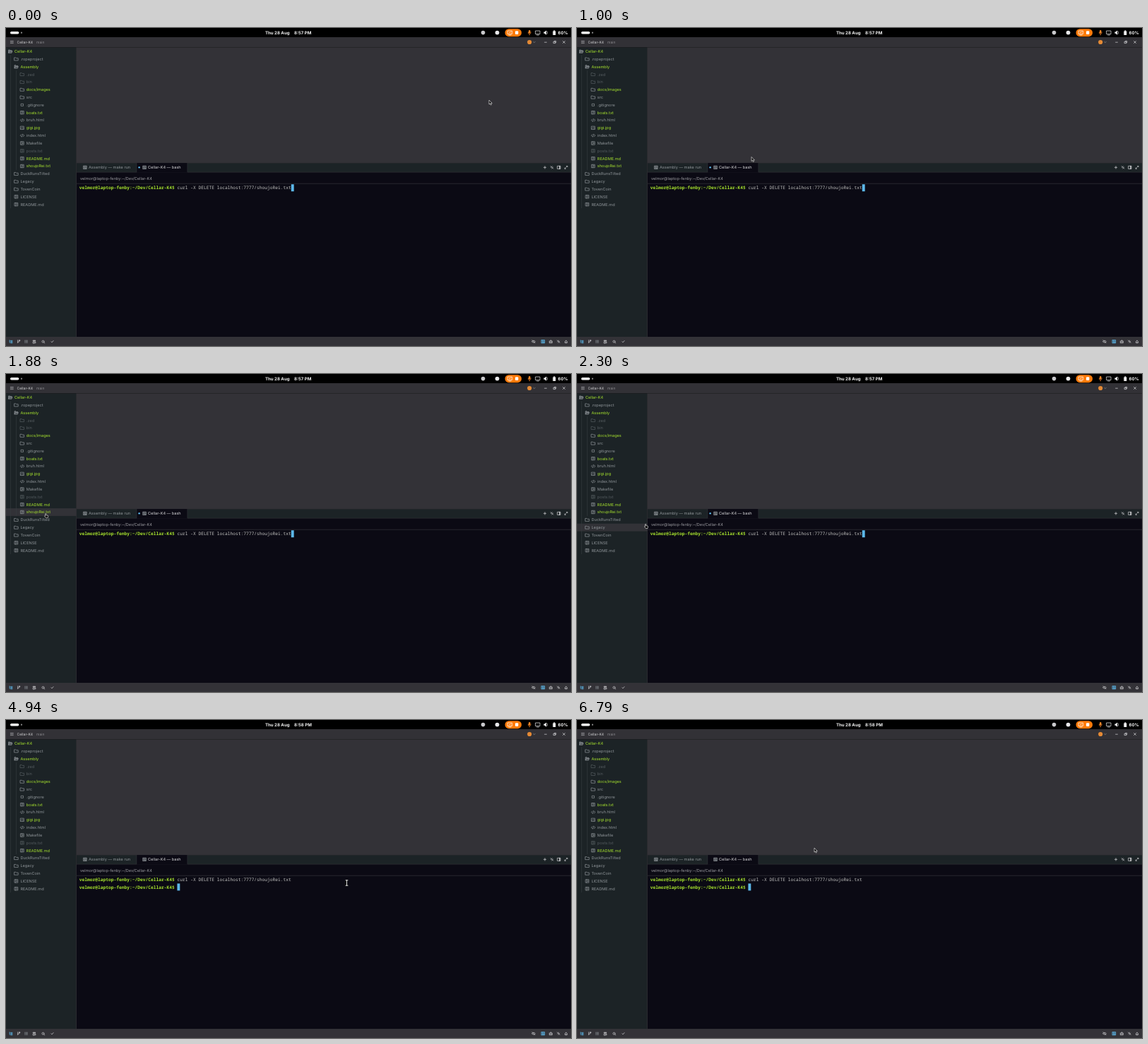
An HTML page for the animation above (7.58 s loop, 800 by 450 pixels).

```html
<!DOCTYPE html>
<html lang="en">
<head>
<meta charset="utf-8">
<title>Deleting a file with curl</title>
<style>
  html, body { margin: 0; width: 100%; height: 100%; overflow: hidden; background: #000; }
  svg { display: block; width: 100vw; height: 100vh; }
  text { font: 5.6px Inter, sans-serif; text-rendering: geometricPrecision; white-space: pre; }
  .bold { font-weight: 700; font-size: 6.1px; }
  .small { font-size: 5px; }
  .term { font: 6.25px "Noto Sans Mono", "DejaVu Sans Mono", monospace; }
  .prompt { font-weight: 700; fill: #a6e22e; }
  .icon { fill: none; fill-opacity: .5; stroke-width: .7; stroke-linejoin: round; stroke-linecap: round; }
  .pointer { fill: #0a0a0a; stroke: #e8e8e8; stroke-width: .65; stroke-linejoin: round; }
</style>
</head>
<body>
<svg id="stage" viewBox="0 0 800 450"></svg>
<script>
const LOOP = 7580;
const ROW = 10.83, TREE_TOP = 27.6, TREE_RIGHT = 99;
const GREEN = '#a6e22e', GREY = '#8e9498', DIM = '#555c60', LIGHT = '#d6d6d8', BLUE = '#5cb8ea';
const HOVER_LAG = 60;
const ENTER = 3790, FILE_GONE = 3920, CLOCK_TICK = 4080;

const USER = 'velmor@laptop-fenby', FOLDER = 'Cellar-K4';
const PROMPT = `${USER}:~/Dev/${FOLDER}$`;
const COMMAND = 'curl -X DELETE localhost:7777/shoujoRei.txt';

// Icons are drawn around their own centre.
const ICONS = {
  folder: 'M-2.6-1.9H-.7L0-1.1H2.6V2.1H-2.6Z',
  open: 'M-2.6 2V-2H-.7L0-1.2H2V-.3M-2.6 2L-1.6-.3H2.8L1.9 2Z',
  file: 'M-2.2-2.2H2.2V2.2H-2.2ZM-.8-2.2V2.2M.4-.8H1.2M.4.5H1.2',
  code: 'M-1.3-1.5L-2.8 0L-1.3 1.5M1.3-1.5L2.8 0L1.3 1.5M.5-1.9L-.5 1.9',
  image: 'M-2.3-2.2H2.3V2.2H-2.3ZM-2.3 1.2L-.7-.3L.6.9L1.3.3L2.3 1.2M.8-1H1',
  square: 'M-1.5-1.5H1.5V1.5H-1.5Z',
  terminal: 'M-2.2-2.2H2.2V2.2H-2.2ZM-1.1-.9L-.1 0L-1.1.9M.2 1H1.2',
  menu: 'M-2-1.6H2M-2 0H2M-2 1.6H2',
  down: 'M-1.2-.5L0 .7L1.2-.5',
  minus: 'M-1.4.2H1.4',
  restore: 'M-1.6-.7H.8V1.6H-1.6ZM-.6-.7V-1.6H1.7V.7H.8',
  close: 'M-1.5-1.5L1.5 1.5M1.5-1.5L-1.5 1.5',
  plus: 'M-1.7 0H1.7M0-1.7V1.7',
  split: 'M-2-2H2V2H-2ZM.5-2V2M1.2-2V2',
  expand: 'M.4-.4L1.9-1.9M.6-1.9H1.9V-.6M-.4.4L-1.9 1.9M-.6 1.9H-1.9V.6',
  pen: 'M-1.8-1.8L1.7 1.7M-1.5.1L.2-1.5M-.3 1.5L1.6-.3',
  tree: 'M-1.8-2V1.6H.4M-1.8-.7H.4M.7-1.4H2V-.2H.7ZM.7 1H2V2.1H.7Z',
  branch: 'M-1.3-2V2M-1.3.6C0 .6 1.3.3 1.3-1M.8-2H1.8V-1H.8Z',
  list: 'M-2-1.5H-1.5M-.5-1.5H2M-2 0H-1.5M-.5 0H2M-2 1.5H-1.5M-.5 1.5H2',
  people: 'M-1.9 2V.7L-.8 0L.2.7V2ZM.7 2H2V.7L1 0M-1.4-1.7H-.3V-.6H-1.4ZM.6-1.7H1.6V-.6H.6Z',
  search: 'M1 0A1.5 1.5 0 1 1-2 0A1.5 1.5 0 1 1 1 0M.6 1.1L1.8 2.2',
  check: 'M-1.5.1L-.5 1.2L1.6-1.2',
  hidden: 'M-2.4 0Q0-3 2.4 0Q0 3-2.4 0M-2-2L2 2',
  robot: 'M-1.8-.8H1.8V2H-1.8ZM0-2V-.8M-.8.4V.8M.8.4V.8',
  bell: 'M-1.7 1.2L-1.2.4V-.7Q0-2.8 1.2-.7V.4L1.7 1.2ZM-.4 2H.4'
};
const SOLID = ['open', 'terminal'];

// depth, icon, label, colour
const FILES = [
  [0, 'open', FOLDER, GREEN], [1, 'folder', '.ropeproject', GREY], [1, 'open', 'Assembly', GREEN],
  [2, 'folder', '.zed', DIM], [2, 'folder', 'bin', DIM], [2, 'folder', 'docs/images', GREEN],
  [2, 'folder', 'src', GREY], [2, 'square', '.gitignore', GREY], [2, 'file', 'boats.txt', GREEN],
  [2, 'code', 'bruh.html', GREY], [2, 'image', 'gigi.jpg', GREEN], [2, 'code', 'index.html', GREY],
  [2, 'file', 'Makefile', GREY], [2, 'file', 'posts.txt', DIM], [2, 'file', 'README.md', GREEN],
  [2, 'file', 'shoujoRei.txt', GREEN], [1, 'folder', 'DuckRunsTilted', GREY],
  [1, 'folder', 'Legacy', GREY], [1, 'folder', 'TovenCoin', GREY],
  [1, 'file', 'LICENSE', GREY], [1, 'file', 'README.md', GREY]
];
const DELETED = 15;

const rect = (x, y, w, h, fill, extra = '') =>
  `<rect x="${x}" y="${y}" width="${w}" height="${h}" fill="${fill}" ${extra}/>`;
const dot = (x, y, r, fill, extra = '') => `<circle cx="${x}" cy="${y}" r="${r}" fill="${fill}" ${extra}/>`;
const text = (x, y, str, fill, cls = '', extra = '') =>
  `<text x="${x}" y="${y}" fill="${fill}" class="${cls}" ${extra}>${str}</text>`;
const icon = (name, x, y, color = GREY) =>
  `<path class="icon" stroke="${color}" style="fill:${SOLID.includes(name) ? color : 'none'}"
    transform="translate(${x} ${y})" d="${ICONS[name]}"/>`;
const iconRow = (y, items) => items.map(([name, x, color]) => icon(name, x, y, color)).join('');

function topBar() {
  return rect(0, 0, 800, 13, '#000') + rect(6, 5, 12.3, 3.4, '#fff', 'rx="1.7"') + dot(22, 6.7, 1.1, '#8a8a8a') +
    text(367, 8.8, 'Thu 28 Aug', '#f4f4f4', 'bold') + text(408, 8.8, '8:57 PM', '#f4f4f4', 'bold', 'id="clock"') +
    dot(675.5, 6.6, 2.8, '#c9c9cc') + dot(695.5, 6.6, 2.9, '#e8e8ea') +
    rect(706.5, 1.2, 23.5, 11, '#ff7b0a', 'rx="5.5"') +
    '<path class="icon" stroke="#fff" d="M710.5 4H716.5V8.5H710.5ZM712 10H715M712.3 6.5L714.8 5.8"/>' +
    rect(721, 4.3, 4.3, 4.6, '#fff', 'rx="1"') +
    '<path class="icon" stroke="#ff8a2a" d="M739.2 6A2 2.5 0 0 0 743.2 6M741.2 8.6V10"/>' +
    rect(740, 3, 2.4, 4.4, '#ff8a2a', 'rx="1.2"') +
    '<path class="icon" stroke="#eee" d="M750 4H756V8.6H750ZM751.5 10H754.5M766 4.6Q767.4 6.6 766 8.6"/>' +
    '<path fill="#eee" d="M761.4 5.4H762.7L765 3.4V9.8L762.7 7.8H761.4Z"/>' +
    rect(774.3, 4.3, 4, 5.8, '#eee', 'rx=".7"') + rect(775.4, 3.3, 1.8, 1.2, '#eee') +
    text(781.5, 8.8, '60%', '#f4f4f4', 'bold');
}

function titleBar() {
  return rect(0, 13, 800, 14.5, '#323136') + icon('menu', 8.3, 20, '#a8a8ac') +
    text(15.6, 21.8, FOLDER, LIGHT, 'small') + text(43, 21.8, 'main', '#8c8c90', 'small') +
    dot(741.2, 20, 3.1, '#e58a35') +
    iconRow(20, [['down', 748], ['minus', 764, LIGHT], ['restore', 777, LIGHT], ['close', 790, LIGHT]]);
}

function fileRow([depth, name, label, color], i) {
  const x = 6 + depth * 8.4, y = TREE_TOP + ROW * (i + .5);
  return `<g id="row${i}">${icon(name, x + .2, y, color === DIM ? DIM : GREY)}${text(x + 6, y + 2, label, color)}</g>`;
}

function sidebar() {
  return rect(0, 27.5, 99.5, 409.5, '#1c2326') + rect(0, 0, 99.5, ROW, '#323237', 'id="hover"') +
    rect(6, TREE_TOP + ROW, .6, ROW * 20, '#353c40', 'id="guide1"') +
    rect(14.2, TREE_TOP + ROW * 3, .6, ROW * 13, '#353c40', 'id="guide2"') +
    FILES.map(fileRow).join('') + rect(99.3, 27.5, .8, 409.5, '#35363b');
}

function panel() {
  return rect(100, 27.5, 700, 163.5, '#333237') +
    rect(100, 191, 700, 13.3, '#1c2326') + rect(100, 204, 700, 233, '#0b0a14') +
    rect(100, 190.8, 700, .6, '#29292f') + rect(100, 203.8, 700, .6, '#34343a') +
    rect(185, 191, 72, 13.6, '#0b0a14') + rect(184.6, 191, .6, 13, '#34343a') + rect(256.6, 191, .6, 13, '#34343a') +
    icon('terminal', 112, 197.3) + text(117, 199.3, 'Assembly — make run', GREY) +
    dot(188.6, 197.3, 1.2, BLUE, 'id="bell"') +
    icon('terminal', 196.2, 197.3) + text(201, 199.3, `${FOLDER} — bash`, LIGHT) +
    iconRow(197.3, [['plus', 763, LIGHT], ['pen', 773, LIGHT], ['split', 783, LIGHT], ['expand', 793, LIGHT]]) +
    text(105, 214.6, `${USER}:~/Dev/${FOLDER}`, '#9a9a9f') + rect(100, 219.8, 700, .7, '#34343a') +
    text(103.8, 228.3, PROMPT, GREEN, 'term prompt') + text(242.5, 228.3, COMMAND, '#c4c4c2', 'term') +
    text(103.8, 238.7, PROMPT, GREEN, 'term prompt', 'id="prompt2"') +
    rect(0, 0, 3.9, 10, BLUE, 'id="caret"');
}

function statusBar() {
  return rect(0, 437, 800, 13, '#333237') + iconRow(443.7, [
    ['tree', 7, BLUE], ['branch', 18, LIGHT], ['list', 28.5], ['people', 40, LIGHT], ['search', 53, LIGHT],
    ['check', 65.5, LIGHT], ['hidden', 747, LIGHT], ['terminal', 760.5, BLUE], ['robot', 771.5, LIGHT],
    ['pen', 782.3, LIGHT], ['bell', 793, LIGHT]]);
}

const POINTERS = `
  <path id="arrow" class="pointer" d="M0 0V6L1.4 4.8L2.4 7L3.4 6.5L2.5 4.4H4.3Z"/>
  <path id="hand" class="pointer" d="M0 .6Q.6-.3 1.2.6V2.6L3.4 3Q4.2 3.2 4 4.1L3.5 6.5H.9L-1.1 4Q-.9 3.1 0 3.8Z"/>
  <g id="beam" fill="none" stroke-linecap="round">
    <path stroke="#0a0a0a" stroke-width="1.8" d="M-1.5-3.7H1.5M0-3.7V3.7M-1.5 3.7H1.5"/>
    <path stroke="#f2f2f2" stroke-width=".9" d="M-1.5-3.7H1.5M0-3.7V3.7M-1.5 3.7H1.5"/>
  </g>`;

document.getElementById('stage').innerHTML =
  topBar() + titleBar() + sidebar() + panel() + statusBar() + `<g id="mouse">${POINTERS}</g>`;

const $ = id => document.getElementById(id);
const show = (id, on) => $(id).setAttribute('visibility', on ? 'visible' : 'hidden');
const moveTo = (id, x, y) => $(id).setAttribute('transform', `translate(${x} ${y})`);

// Mouse strokes as [time, x, y]; the mouse rests between them.
const STROKES = [
  [[0, 684, 102], [480, 595, 107], [780, 420, 142], [1080, 190, 196], [1280, 94, 219], [1410, 82, 216],
   [1480, 78, 207], [1780, 54, 199], [2030, 66, 198], [2200, 86, 214], [2300, 96, 212],
   [2600, 300, 225], [2970, 506, 229]],
  [[4940, 482.5, 230.5], [5200, 300, 226], [5450, 130, 208], [5650, 70, 197], [5900, 56, 195],
   [6150, 90, 194], [6450, 216, 194], [6790, 336, 181]]
];

function slope(pts, i, axis) {
  const a = pts[i - 1], b = pts[i + 1];
  return a && b ? (b[axis] - a[axis]) / (b[0] - a[0]) : 0;
}

function mouseAt(t) {
  const pts = t < STROKES[1][0][0] ? STROKES[0] : STROKES[1];
  const next = pts.findIndex(p => p[0] > t);
  if (next < 0) return pts[pts.length - 1].slice(1);
  if (next === 0) return pts[0].slice(1);
  const a = pts[next - 1], b = pts[next], span = b[0] - a[0], u = (t - a[0]) / span;
  const v = 1 - u;
  return [1, 2].map(k =>
    v * v * (1 + 2 * u) * a[k] + u * u * (3 - 2 * u) * b[k] +
    span * u * v * (v * slope(pts, next - 1, k) - u * slope(pts, next, k)));
}

function pointerFor(x, y) {
  if (x < TREE_RIGHT) return y > TREE_TOP ? 'hand' : 'arrow';
  return y > 220.5 && y < 437 ? 'beam' : 'arrow';
}

function drawTree(t) {
  const gone = t >= FILE_GONE, shift = gone ? ROW : 0;
  show('row' + DELETED, !gone);
  for (let i = DELETED + 1; i < FILES.length; i++) moveTo('row' + i, 0, -shift);
  $('guide1').setAttribute('height', ROW * 20 - shift);
  $('guide2').setAttribute('height', ROW * 13 - shift);

  const [x, y] = mouseAt(Math.max(0, t - HOVER_LAG));
  const row = Math.floor((y - TREE_TOP) / ROW);
  show('hover', x < TREE_RIGHT && row >= 0 && row < FILES.length - (gone ? 1 : 0));
  moveTo('hover', 0, TREE_TOP + row * ROW);
}

function draw(t) {
  const entered = t >= ENTER;
  drawTree(t);
  $('clock').textContent = t < CLOCK_TICK ? '8:57 PM' : '8:58 PM';
  show('bell', !entered);
  show('prompt2', entered);
  if (entered) moveTo('caret', 242.4, 231.4);
  else moveTo('caret', 403.8, 221.2);

  const [x, y] = mouseAt(t), shape = pointerFor(x, y);
  moveTo('mouse', x, y);
  for (const id of ['arrow', 'hand', 'beam']) show(id, id === shape);
}

const start = performance.now();
function tick() {
  draw((performance.now() - start) % LOOP);
  requestAnimationFrame(tick);
}
tick();
</script>
</body>
</html>
```
